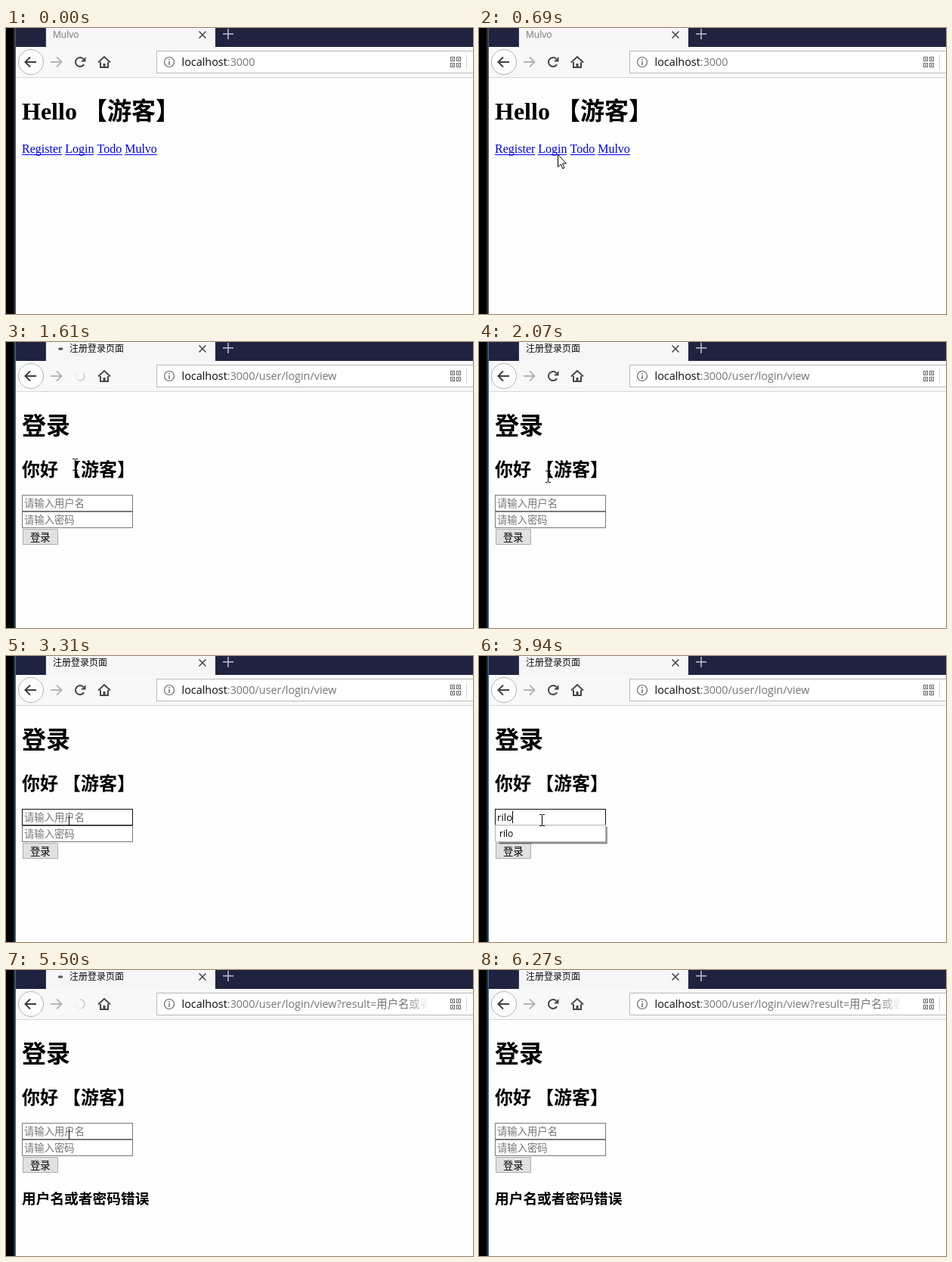
Animation of 618x378 px, one loop 8000 ms. Source, as an HTML page with a canvas:

```html
<!DOCTYPE html>
<html lang="zh-CN">
<head>
<meta charset="utf-8">
<title>Login demo</title>
<style>
html, body { margin: 0; width: 100%; height: 100%; overflow: hidden; background: #fefefe; }
canvas { display: block; }
</style>
</head>
<body>
<canvas id="stage" width="618" height="378"></canvas>
<script>
const ctx = document.getElementById('stage').getContext('2d');
const LOOP = 8000;
const UI = '"Open Sans", "Noto Sans CJK SC", "Noto Sans CJK", sans-serif';
const SERIF = '"Liberation Serif", "Noto Sans CJK SC", "Noto Sans CJK", serif';
const SITE = 'Mulvo', USER = 'rilo', GUEST = '【游客】', LOGIN = '登录';

// Latest value whose start time has passed.
const at = (t, steps) => steps.reduce((v, [time, value]) => t >= time ? value : v, undefined);
const within = (t, a, b) => t >= a && t < b;

function rect(x, y, w, h, color) {
  ctx.fillStyle = color;
  ctx.fillRect(x, y, w, h);
}

function box(x, y, w, h, fill, border) {
  rect(x, y, w, h, border);
  rect(x + 1, y + 1, w - 2, h - 2, fill);
}

function text(str, x, y, font, color = '#000') {
  ctx.font = font;
  ctx.fillStyle = color;
  ctx.fillText(str, x, y);
  return ctx.measureText(str).width;
}

function path(points, { stroke, fill, width = 1, close = false }) {
  ctx.beginPath();
  points.forEach(([x, y]) => ctx.lineTo(x, y));
  if (close) ctx.closePath();
  if (fill) { ctx.fillStyle = fill; ctx.fill(); }
  if (stroke) { ctx.strokeStyle = stroke; ctx.lineWidth = width; ctx.stroke(); }
}

function arc(x, y, r, { stroke, fill, width = 1, from = 0, to = Math.PI * 2 }) {
  ctx.beginPath();
  ctx.arc(x, y, r, from, to);
  if (fill) { ctx.fillStyle = fill; ctx.fill(); }
  if (stroke) { ctx.strokeStyle = stroke; ctx.lineWidth = width; ctx.stroke(); }
}

function arrowIcon(x, y, dir, color) {
  const pen = { stroke: color, width: 2 };
  path([[x - 7 * dir, y], [x + 7 * dir, y]], pen);
  path([[x + dir, y - 6.5], [x + 7.5 * dir, y], [x + dir, y + 6.5]], pen);
}

function reloadIcon(t, loading) {
  if (loading) {
    const spin = (t - 5500) / 160;
    arc(98, 45, 6, { stroke: '#c9c9cc', width: 1.5, from: spin - 1.6, to: spin + 1.2 });
    arc(98, 45, 6, { stroke: '#ececee', width: 1.5, from: spin + 1.2, to: spin + 3.6 });
    return;
  }
  const color = within(t, 5960, 6130) ? '#b5b5b8' : '#47474a';
  arc(98, 45, 6, { stroke: color, width: 2, from: 0.55, to: 5.5 });
  path([[105.5, 38], [105.5, 44.5], [99, 44.5]], { fill: color, close: true });
}

function homeIcon() {
  const pen = { stroke: '#47474a', width: 2 };
  path([[122, 45.5], [130, 38], [138, 45.5]], pen);
  path([[125, 45], [125, 52], [135, 52], [135, 45]], pen);
  rect(128.5, 47, 3, 5, '#47474a');
}

function gridIcon() {
  for (const x of [588.5, 596.5]) for (const y of [38.5, 46.5]) {
    ctx.strokeStyle = '#666';
    ctx.lineWidth = 1;
    ctx.strokeRect(x, y, 5, 5);
    rect(x + 1.5, y + 1.5, 2, 2, '#777');
  }
}

function drawAddress(loginPage, failed) {
  const font = '14.4px ' + UI;
  ctx.save();
  ctx.beginPath();
  ctx.rect(228, 32, 330, 26);
  ctx.clip();
  let x = 232.5;
  x += text('localhost', x, 50, font, '#0c0c0d');
  const rest = ':3000' + (loginPage ? '/user/login/view' : '') + (failed ? '?result=用户名或者密码错误' : '');
  text(rest, x, 50, font, '#757578');
  ctx.restore();
  if (failed) {
    const fade = ctx.createLinearGradient(530, 0, 558, 0);
    fade.addColorStop(0, 'rgba(255,255,255,0)');
    fade.addColorStop(1, '#fff');
    rect(530, 32, 29, 26, fade);
  }
}

function drawBrowser(t, s) {
  rect(0, 0, 618, 378, '#fefefe');
  rect(0, 0, 10, 378, '#000');
  rect(10, 0, 2, 378, '#2e2e2e');
  rect(12, 0, 1, 378, s.active ? '#1779ae' : '#555');
  rect(13, 0, 605, 25, '#202340');
  rect(52, 0, 1, 25, '#34375a');
  rect(53, 0, 224, 25, '#f6f6f7');
  rect(13, 25, 605, 40, '#f8f8f9');
  rect(13, 65, 605, 1, '#d8d8da');

  const title = s.loginPage ? '注册登录页面' : SITE;
  text(title, s.loading ? 84 : 62, 13, '12px ' + UI, s.active ? '#0c0c0d' : '#747478');
  if (s.loading) {
    ctx.fillStyle = '#5a5a5e';
    ctx.beginPath();
    ctx.ellipse(70 + 5 * Math.sin((t - 5430) / 170), 9, 3.2, 1.8, 0, 0, Math.PI * 2);
    ctx.fill();
  }
  const closePen = { stroke: '#4a4a4f', width: 1.6 };
  path([[255.5, 4.5], [264.5, 13.5]], closePen);
  path([[264.5, 4.5], [255.5, 13.5]], closePen);
  rect(287, 7, 14, 1.6, '#b7b8c5');
  rect(293.2, 1, 1.6, 14, '#b7b8c5');

  arc(33, 45, 16.5, { stroke: '#b4b4b6', fill: '#fdfdfd' });
  arrowIcon(33, 45, -1, '#3f3f43');
  arrowIcon(66, 45, 1, '#b5b5b8');
  reloadIcon(t, s.loading);
  homeIcon();

  box(199, 30, 430, 30, '#fff', '#b9b9bb');
  arc(216, 45, 6.5, { stroke: '#68686c', width: 1.2 });
  rect(215.3, 44, 1.5, 5, '#68686c');
  rect(215.3, 41, 1.5, 1.6, '#68686c');
  gridIcon();
  rect(609, 35, 1, 20, '#d7d7db');
  drawAddress(s.loginPage, s.failed);
}

function drawHome(t) {
  text('Hello ' + GUEST, 21, 121, 'bold 32px ' + SERIF);
  let x = 21;
  for (const label of ['Register', 'Login', 'Todo', SITE]) {
    const color = label === 'Login' && within(t, 1300, 1530) ? '#ee0000' : '#0000ee';
    const w = text(label, x, 165, '16px ' + SERIF, color);
    rect(Math.round(x), 167, Math.round(w), 1, color);
    x += w + 4;
  }
}

function popup(y, rows) {
  const h = rows.length * 21 + 2;
  rect(27, y + 3, 143.5, h, 'rgba(0,0,0,.18)');
  rect(26, y + 2, 143.5, h, 'rgba(0,0,0,.3)');
  box(21, y, 147, h, '#fff', '#b0b0b0');
  rows.forEach((row, i) => text(row, 27, y + 16 + i * 21, '12px ' + UI));
}

function drawLogin(t, s) {
  const small = '13.333px ' + UI;
  const typed = s.failed ? '' : USER.slice(0, at(t, [[0, 0], [3460, 1], [3780, 2], [3860, 3], [3940, 4]]));
  const dots = s.failed ? 0 : at(t, [[0, 0], [4470, 1], [4700, 2], [5030, 3]]);
  const hovered = within(t, 2300, 5430);
  const onPassword = within(t, 4150, 5430);

  text(LOGIN, 21, 122, 'bold 32px ' + SERIF);
  text('你好 ' + GUEST, 21, 177, 'bold 24px ' + SERIF);

  box(21, 202, 147, 22, '#fff', hovered ? '#111' : '#7a7a7a');
  box(21, 224, 147, 22, '#fff', onPassword ? '#111' : '#7a7a7a');
  const typedWidth = text(typed || '请输入用户名', 24, 218, small, typed ? '#000' : '#757575');
  if (!dots) text('请输入密码', 24, 240, small, '#757575');
  for (let i = 0; i < dots; i++) arc(27.5 + i * 7, 235.5, 2.6, { fill: '#000' });

  const nameCaret = within(t, 2760, 3310) || within(t, 3460, 4150);
  if (nameCaret) rect(Math.round(24 + (typed ? typedWidth : 0)), 205, 1, 16, '#000');
  if (within(t, 4150, 5180)) rect(24 + dots * 7, 227, 1, 16, '#000');

  box(22, 247, 47, 21, '#e1e1e1', '#adadad');
  text(LOGIN, 32, 263, small);

  if (within(t, 3540, 3780)) popup(223, [USER, 'rona']);
  if (within(t, 3780, 4150)) popup(223, [USER]);
  if (within(t, 4470, 4550)) popup(245, ['']);
  if (s.failed) text('用户名或者密码错误', 21, 309, 'bold 18.72px ' + SERIF);
}

function pointer(x, y) {
  path([[0, 0], [0, 16], [3.7, 12.6], [6.2, 18.3], [8.5, 17.3], [6, 11.7], [11, 11.5]]
    .map(([dx, dy]) => [x + dx + .5, y + dy + .5]), { fill: '#fff', stroke: '#000', close: true });
}

function hand(x, y) {
  path([[-1.5, 1], [0, 0], [1.5, 1], [1.5, 8], [4, 8], [5, 9.5], [7, 9], [8, 10.5], [9.5, 10.5],
    [10.5, 12], [10, 18], [8, 24], [-1, 24], [-3, 20], [-7, 15], [-6, 13], [-4, 13.5], [-1.5, 16]]
    .map(([dx, dy]) => [x + dx, y + dy]), { fill: '#fff', stroke: '#222', close: true });
  for (const dx of [1.5, 4.5, 7.5]) rect(x + dx - .4, y + 8, .8, 4.5, '#222');
}

function beam(x, y, serifs) {
  rect(x, y - 7, 1, 14, '#000');
  if (!serifs) return;
  for (const dy of [-8, 7]) {
    rect(x - 3, y + dy, 3, 1, '#000');
    rect(x + 1, y + dy, 3, 1, '#000');
  }
}

const sampled = (t, start, end, steps) =>
  Math.min(1, Math.floor((t - start) / (end - start) * (steps - 1) + 1e-6) / (steps - 1));
const mix = (a, b, k) => Math.round(a + (b - a) * k);

function drawCursor(t) {
  if (within(t, 1300, 1450) || within(t, 2760, 2910)) {
    const [x, y] = t < 2000 ? [92, 161] : [84, 217];
    arc(x, y, 11.5, { fill: 'rgba(255,240,0,.55)' });
  }
  if (within(t, 310, 1530)) {
    const k = sampled(t, 310, 840, 8);
    const eased = k * (2 - k);
    const x = mix(243, 92, eased), y = mix(240, 161, eased);
    (k === 1 ? hand : pointer)(x, y);
  } else if (within(t, 1530, 2070)) {
    beam(91, 162, true);
  } else if (within(t, 2070, 6130)) {
    const k = sampled(t, 2070, 2380, 5);
    beam(mix(91, 83, k), mix(178, 217, k), k < 1 || within(t, 3460, 5430));
  } else if (within(t, 6130, 6270)) {
    const k = t < 6200 ? 0 : 1;
    pointer(mix(200, 305, k), mix(282, 336, k));
  }
}

function draw(t) {
  const state = {
    active: t >= 1300,
    loginPage: t >= 1530,
    failed: t >= 5430,
    loading: within(t, 1530, 1910) || within(t, 5350, 5960)
  };
  drawBrowser(t, state);
  if (state.loginPage) drawLogin(t, state);
  else drawHome(t);
  drawCursor(t);
}

const start = performance.now();
function frame() {
  draw((performance.now() - start) % LOOP);
  requestAnimationFrame(frame);
}
frame();
</script>
</body>
</html>
```
